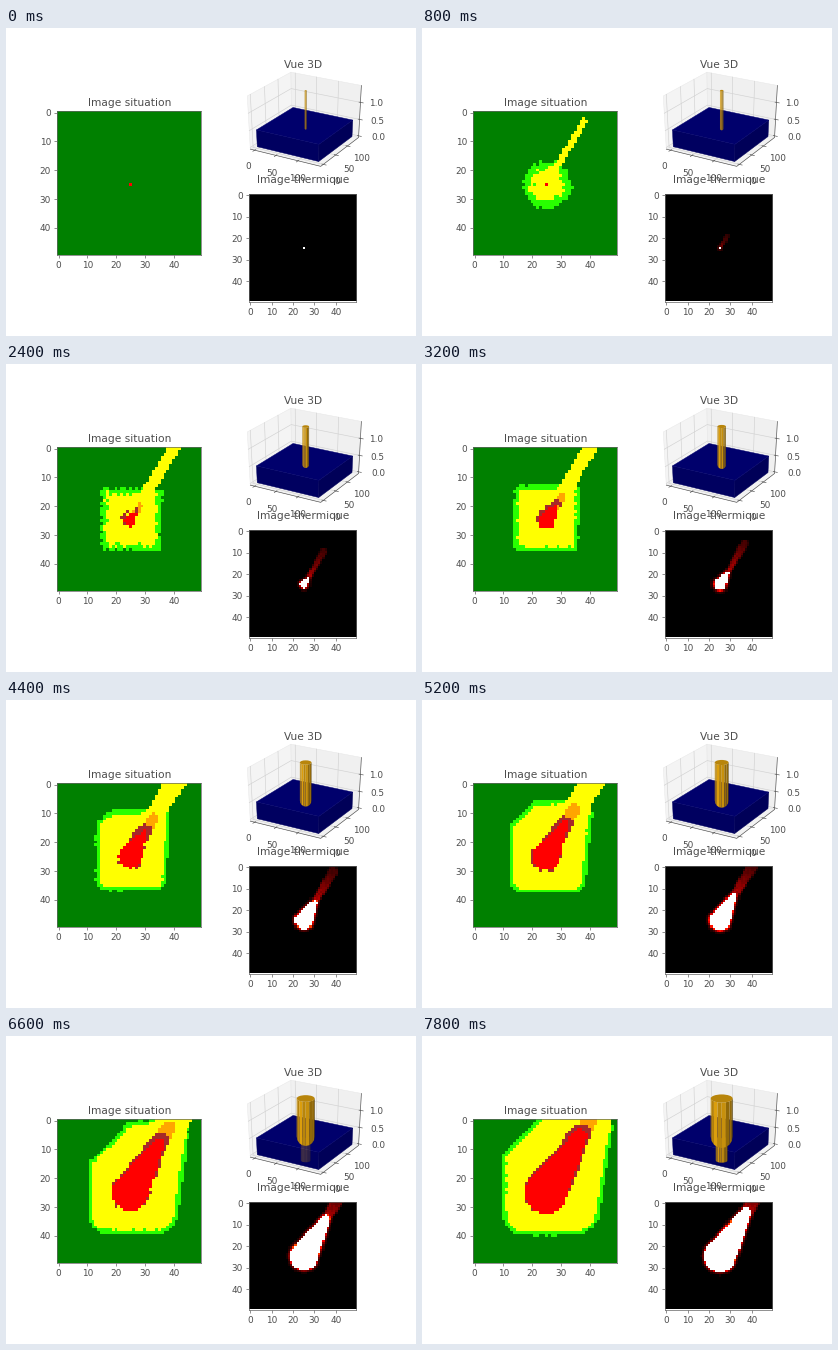
A matplotlib script for the animation above (8000 ms loop, 410 by 308 pixels).

```python
import numpy as np
import matplotlib.pyplot as plt
from matplotlib import colormaps
from matplotlib.animation import FuncAnimation
from matplotlib.patches import Ellipse, Polygon

W, H, DPI = 410, 308, 64
STEPS, DT = 40, 0.2
INK = "0.3"
plt.rcParams.update({
    "font.family": "DejaVu Sans", "text.color": INK, "axes.edgecolor": "0.4",
    "xtick.color": "0.4", "ytick.color": "0.4",
    "xtick.labelcolor": INK, "ytick.labelcolor": INK,
})

GREEN, LIME, YELLOW = (0, 128, 0), (40, 255, 0), (255, 255, 0)
ORANGE, BROWN, RED = (255, 165, 0), (165, 42, 42), (255, 0, 0)
N = 50
ROW, COL = np.mgrid[0:N, 0:N].astype(float)
NOISE = np.random.default_rng(4).random((N, N))

# Fire outline at a few moments, joined linearly.
TIMES = [0, 1.6, 3.2, 4.4, 5.8, 6.6, 7.8]
KEYS = {
    "core": [0.4, 1.2, 2.9, 4.1, 5.3, 6.4, 7.3],
    "tip_x": [25, 25, 28.4, 30, 32.3, 35.2, 36.9],
    "tip_y": [25, 25, 20, 16.6, 11.9, 7.7, 5.2],
    "tip_r": [0.3, 0.4, 0.6, 1, 1.5, 1.7, 2.4],
    "left": [16, 16, 13.8, 13, 11.5, 10.3, 9.5],
    "right": [35, 35, 36.2, 38, 40.8, 42.6, 44.7],
    "top": [15, 15, 12.8, 8.8, 3.3, 0, -3],
    "bottom": [35, 35, 35.6, 37, 38.5, 39.5, 40],
    "round": [0.5, 0.5, 2, 4, 6, 7, 8],
    "chamfer": [0, 20, 24, 27, 25.8, 25, 21.5],
    "band": [0.7, 1.6, 2.5, 3.7, 5.2, 5.7, 6.4],
    "reach": [0, 13, 22, 26, 32, 34, 38],
    "ragged": [2.6, 2.6, 0.7, 0.3, 0.3, 0.3, 0.3],
}


def cone(p, q, r0, r1):
    """Distance to a tapered capsule, and the position along its axis."""
    dx, dy = q[0] - p[0], q[1] - p[1]
    span = max(dx * dx + dy * dy, 1e-6)
    s = np.clip(((COL - p[0]) * dx + (ROW - p[1]) * dy) / span, 0, 1)
    dist = np.hypot(COL - p[0] - s * dx, ROW - p[1] - s * dy)
    return dist - r0 - s * (r1 - r0), s


def round_box(k, lean):
    """Rounded box whose right side leans outwards at the top."""
    col = COL + lean * (ROW - 25) * np.clip((COL - 25) / 15, 0, 1)
    hw, hh = (k["right"] - k["left"]) / 2, (k["bottom"] - k["top"]) / 2
    qx = np.abs(col - k["left"] - hw) - hw + k["round"]
    qy = np.abs(ROW - k["top"] - hh) - hh + k["round"]
    outer = np.hypot(np.maximum(qx, 0), np.maximum(qy, 0))
    return outer + np.minimum(np.maximum(qx, qy), 0) - k["round"]


def smooth_min(a, b, k):
    h = np.maximum(k - np.abs(a - b), 0) / k
    return np.minimum(a, b) - h * h * k / 4


def fields(t):
    k = {name: np.interp(t, TIMES, v) for name, v in KEYS.items()}
    tip = (k["tip_x"], k["tip_y"])
    fire, _ = cone((25, 25), tip, k["core"], k["tip_r"])
    scorch = fire - 0.7 - np.clip((tip[1] + 3 - ROW) / 3, 0, 1)

    grow = min(1, t)
    band, _ = cone((25, 25), (25 + 16.5 * grow, 25 - 27.5 * grow),
                   min(k["band"], 2.2), k["band"])
    if t == 0:
        band = band + 99

    rho = np.hypot(COL - 25.3, ROW - 25.2)
    spread = 12.5 * np.sqrt(t / 1.6) if t < 1.6 else 12.5 + 6 * (t - 1.6)
    body = round_box(k, 0.02 * t)
    body = np.maximum(body, (k["chamfer"] - COL - ROW) / 1.41)
    body = np.maximum(body, rho - spread + (0.5 if t else 99))
    rough = k["ragged"] * (NOISE - 0.35)
    blend = 0.1 + 0.6 * t
    lime = smooth_min(body + 0.5 * rough, band + 1, blend)
    dry = np.maximum(body + 1.4 + rough, rho - spread + 3 + rough)
    dry = smooth_min(dry, band, blend)

    lead = min(1, t / 4.4)
    ember, _ = cone(tip, (tip[0] + 3 * lead, tip[1] - 5 * lead),
                    min(2.6, 0.4 * t), min(2.6, 0.4 * t))

    ux, uy = 0.515, -0.857
    end = (25 + ux * k["reach"], 25 + uy * k["reach"])
    glow, along = cone(tip, end, k["tip_r"] + 0.3, 0.6 + 0.35 * t)
    return fire, lime, dry, ember, scorch, glow, along


def situation(t, f):
    fire, lime, dry, ember, scorch = f[:5]
    img = np.empty((N, N, 3), np.uint8)
    img[:] = GREEN
    img[lime < 0] = LIME
    img[dry < 0] = YELLOW
    if t > 2:
        img[ember < 0] = ORANGE
        img[(scorch < 0) & ((ROW < 20) | (NOISE < 0.35))] = BROWN
    img[fire < 0] = RED
    return img


def thermal(t, f):
    fire, glow, along = f[0], f[5], f[6]
    heat = np.zeros((N, N))
    if t > 0:
        halo = 0.6 * min(1, t / 4) * np.exp(-np.maximum(fire, 0) / 0.5)
        peak = min(0.28, 0.14 + 0.05 * t)
        plume = peak * (1 - 0.65 * along) * np.clip(0.6 - glow, 0, 1)
        heat = np.maximum(halo, plume * (0.8 + 0.2 * NOISE))
    heat[fire < 0.1] = 1
    return colormaps["hot"](heat)[..., :3] * (heat > 0.02)[..., None]


def project(x, y, z):
    """Perspective view of the unit cube, in stage pixels."""
    p = np.array([x, y, z], float) - 0.5
    depth = 10 - p @ (0.433, -0.75, 0.5)
    return (299.3 + 780.5 * (p @ (0.866, 0.5, 0)) / depth,
            89.6 - 582.7 * (p @ (-0.25, 0.433, 0.866)) / depth)


def face(points, color, z=1, edge="none"):
    patch = Polygon([project(*p) for p in points], facecolor=color,
                    edgecolor=edge, linewidth=0.5, zorder=z)
    view.add_patch(patch)


def line(points, color, width=0.7, z=2):
    xs, ys = zip(*[project(*p) for p in points])
    view.plot(xs, ys, color=color, lw=width, zorder=z)


def label(x, y, s, size=10):
    view.text(x, y, s, fontsize=size, ha="center", va="center", zorder=9)


def scene():
    a, b = -1 / 48, 1 + 1 / 48
    face([(a, a, a), (a, b, a), (a, b, b), (a, a, b)], "0.955", edge="0.9")
    face([(a, b, a), (b, b, a), (b, b, b), (a, b, b)], "0.94", edge="0.9")
    face([(a, a, a), (b, a, a), (b, b, a), (a, b, a)], "0.95", edge="0.9")
    for v in (0, 50, 100):
        u = (v + 7) / 154
        line([(u, a, a), (u, b, a), (u, b, b)], "0.82")
        line([(b, u, a), (a, u, a), (a, u, b)], "0.82")
        line([(u, a - 0.04, a), (u, a + 0.02, a)], INK)
        line([(b + 0.04, u, a), (b - 0.02, u, a)], INK)
    for v in (0, 0.5, 1):
        u = (v + 0.02) / 1.47
        line([(a, a, u), (a, b, u), (b, b, u)], "0.82")
        line([(b - 0.02, b, u), (b + 0.04, b, u)], INK)
    line([(a, a, a), (b, a, a), (b, b, a), (b, b, b)], INK)

    lo, hi, base, top = 0.045, 0.955, 0.014, 0.354
    for color, points in (
            ("#000060", [(lo, lo, base), (hi, lo, base),
                         (hi, lo, top), (lo, lo, top)]),
            ("#000058", [(hi, lo, base), (hi, hi, base),
                         (hi, hi, top), (hi, lo, top)]),
            ("#00006c", [(lo, lo, top), (hi, lo, top),
                         (hi, hi, top), (lo, hi, top)])):
        face(points, color, 3, color)

    for x, y, s in ((242, 138.8, "0"), (265.7, 145.2, "50"),
                    (291.2, 150.2, "100"), (331, 153.5, "0"),
                    (343, 141.8, "50"), (355.5, 130.8, "100"),
                    (372, 110, "0.0"), (371.3, 93, "0.5"),
                    (370.3, 75, "1.0")):
        label(x, y, s)
    label(297, 37, "Vue 3D", 12)
    label(297, 152, "Image thermique", 12)


def picture(box, title=None):
    ax = fig.add_axes(box)
    if title:
        ax.set_title(title, fontsize=12)
    ax.set_xticks(range(0, 50, 10))
    ax.set_yticks(range(0, 50, 10))
    im = ax.imshow(np.zeros((N, N, 3)), interpolation="nearest")
    ax.tick_params(labelsize=10, width=0.8)
    return im


def box(x, y, side):
    return x / W, 1 - (y + side) / H, side / W, side / H


fig = plt.figure(figsize=(W / DPI, H / DPI), dpi=DPI, facecolor="white")
left = picture(box(51.2, 83.2, 144), "Image situation")
right = picture(box(243, 166.3, 107.2))
view = fig.add_axes([0, 0, 1, 1], facecolor="none")
view.axis("off")
view.set(xlim=(0, W), ylim=(H, 0))
scene()

ANGLES = np.linspace(-np.pi / 2, np.pi / 2, 9)
CX, TOP, FLAT = 299.7, 62.5, 0.37
GOLD = np.array([0.86, 0.62, 0.05])


def strips(z):
    out = []
    for i in range(8):
        tone = 0.66 + 0.34 * np.cos(ANGLES[i] + 0.75) - 0.14 * (i % 2)
        patch = Polygon([(0, 0)] * 4, facecolor=GOLD * tone, zorder=z)
        view.add_patch(patch)
        out.append(patch)
    return out


column, stub = strips(6), strips(5)
cap = Ellipse((CX, TOP), 1, 1, facecolor=GOLD * 0.84, zorder=7)
view.add_patch(cap)


def shape(parts, r, top, bottom, sag):
    xs, depth = CX + r * np.sin(ANGLES), r * np.cos(ANGLES)
    hi, lo = top + FLAT * depth, bottom + sag * depth
    for i, p in enumerate(parts):
        j = i + 1
        p.set_xy([(xs[i], hi[i]), (xs[j], hi[j]),
                  (xs[j], lo[j]), (xs[i], lo[i])])


def draw(n):
    t = n * DT
    f = fields(t)
    left.set_data(situation(t, f))
    right.set_data(thermal(t, f))

    r = 1 + 0.85 * t + 0.055 * t * t
    shape(column, r, TOP, 100.5, 1.05)
    cap.width, cap.height = 2 * r, 2 * FLAT * r
    shape(stub, 0.54 * r, 100, 124.5, FLAT)
    for p in stub:
        p.set_visible(t > 6)
        p.set_alpha(float(np.clip(0.3 + 0.6 * (t - 6.6), 0, 0.95)))
    return left, right, cap, *column, *stub


anim = FuncAnimation(fig, draw, frames=STEPS, interval=1000 * DT,
                     repeat=True, repeat_delay=0, blit=False)
plt.show()
```
